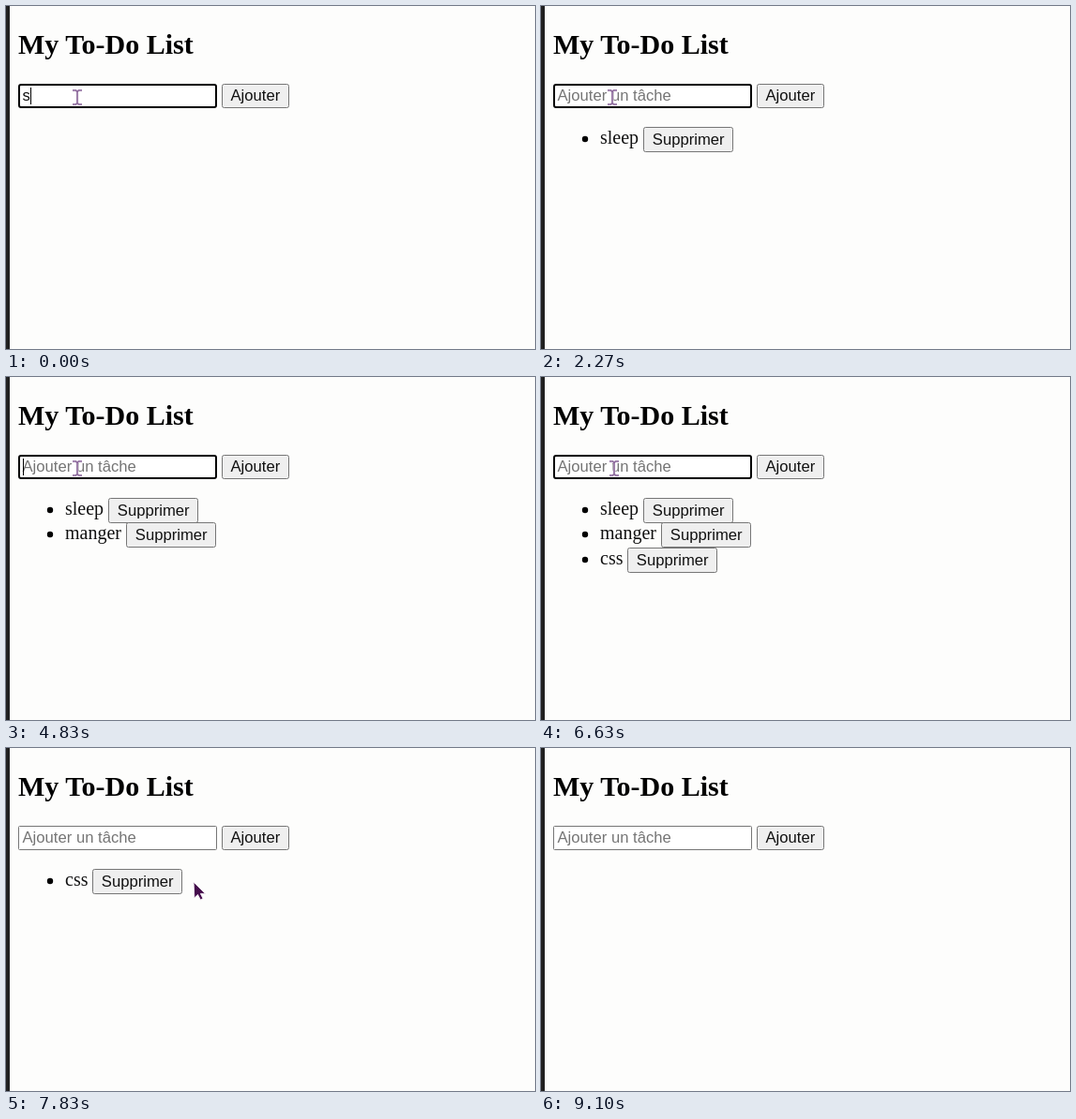
An HTML page that plays this animation: 564x366 px, repeating every 9.16 s.

```html
<!DOCTYPE html>
<html lang="fr">
<head>
<meta charset="utf-8">
<title>My To-Do List</title>
<style>
  html, body { margin: 0; width: 100%; height: 100%; overflow: hidden; background: #fdfdfc; }
  svg { display: block; }
  .serif { font-family: "Liberation Serif", "Times New Roman", serif; font-size: 20px; fill: #111; }
  .title { font-size: 30px; font-weight: bold; fill: #000; }
  .sans { font-family: "Liberation Sans", Arial, sans-serif; font-size: 16.667px; fill: #111; }
  .hint { fill: #757575; }
  .button rect { fill: #efefef; stroke: #767676; }
</style>
</head>
<body>
<svg width="564" height="366" viewBox="0 0 564 366">
  <rect width="564" height="366" fill="#fdfdfc"/>
  <rect width="4" height="366" fill="#202020"/>
  <text class="serif title" x="13" y="51">My To-Do List</text>
  <rect id="box" fill="#fff"/>
  <text id="field" class="sans" x="17.5" y="101"></text>
  <rect id="caret" y="87" width="1" height="18"/>
  <g class="button">
    <rect x="230.5" y="83.5" width="71" height="25" rx="2"/>
    <text class="sans" x="239.5" y="101">Ajouter</text>
  </g>
  <g id="list"></g>
  <g id="beam" fill="none">
    <path d="M-5 -7.5H-1.5L0 -6L1.5 -7.5H5M0 -6V6M-5 7.5H-1.5L0 6L1.5 7.5H5" stroke="#efe8f0" stroke-width="3"/>
    <path d="M-5 -7.5H-1.5L0 -6L1.5 -7.5H5M0 -6V6M-5 7.5H-1.5L0 6L1.5 7.5H5" stroke="#8a669a" stroke-width="1.6"/>
  </g>
  <path id="arrow" d="M0 0L.8 17L4.4 13.4L7.4 19L10 17.6L7.4 12.4H12.5Z" fill="#450c4c" stroke="#efe8f0"/>
</svg>
<script>
const LOOP = 9160;
const HINT = 'Ajouter un tâche';
const BLUR = 7230;

// [time, field text]; an empty text shows the placeholder
const typing = [
  [0, 's'], [330, 'sl'], [680, 'sle'], [980, 'slee'], [1370, 'sleep'], [1740, ''],
  [2350, 'm'], [2550, 'ma'], [2760, 'man'], [2950, 'mang'], [3150, 'mange'], [3350, 'manger'], [3660, ''],
  [5150, 'c'], [5450, 'cs'], [5680, 'css'], [6080, '']
];

// label, time added, time removed, x of its button
const tasks = [
  ['sleep', 1740, BLUR, 109],
  ['manger', 3660, 7640, 128],
  ['css', 6080, 8570, 92]
];

// [time, x, y]
const path = [
  [0, 76, 97.5], [6540, 76, 97.5], [6630, 78, 97.5], [7040, 200, 143], [7960, 200, 143],
  [8300, 168, 147], [8660, 168, 147], [8960, 510, 149], [9060, 580, 140], [LOOP, 580, 140]
];

const $ = id => document.getElementById(id);
const set = (el, attrs) => { for (const k in attrs) el.setAttribute(k, attrs[k]); };
const show = (el, on) => { el.style.display = on ? '' : 'none'; };

const rows = tasks.map(([label, from, to, x]) => {
  const el = document.createElementNS('http://www.w3.org/2000/svg', 'g');
  el.innerHTML = `<circle cx="47" cy="142" r="3.2"/>
    <text class="serif" x="63" y="147">${label}</text>
    <g class="button"><rect x="${x + .5}" y="129.5" width="95" height="26" rx="2"/>
    <text class="sans" x="${x + 9.8}" y="148">Supprimer</text></g>`;
  $('list').append(el);
  return { el, from, to };
});

function pointerAt(t) {
  const i = Math.max(1, path.findIndex(p => p[0] > t));
  const [t0, x0, y0] = path[i - 1], [t1, x1, y1] = path[i];
  const u = (t - t0) / (t1 - t0), e = u * u * (3 - 2 * u);
  return [x0 + (x1 - x0) * e, y0 + (y1 - y0) * e];
}

function draw(t) {
  const [keyTime, text] = typing.filter(k => k[0] <= t).pop();
  const focus = t < BLUR;
  const field = $('field');
  if (field.textContent !== (text || HINT)) field.textContent = text || HINT;
  field.classList.toggle('hint', !text);
  set($('box'), focus
    ? { x: 14, y: 84, width: 210, height: 24, rx: 2, stroke: '#000', 'stroke-width': 2 }
    : { x: 13.5, y: 83.5, width: 211, height: 25, rx: 1, stroke: '#767676', 'stroke-width': 1 });
  show($('caret'), focus && (t - keyTime) % 1000 < 500);
  $('caret').setAttribute('x', text ? Math.round(17.5 + field.getComputedTextLength()) : 18);

  let line = 0;
  for (const { el, from, to } of rows) {
    const on = t >= from && t < to;
    show(el, on);
    if (on) el.setAttribute('transform', `translate(0 ${Math.floor(26.5 * line++)})`);
  }

  const [x, y] = pointerAt(t);
  const inField = x > 13 && x < 225 && y > 83 && y < 109;
  for (const id of ['beam', 'arrow']) {
    show($(id), (id === 'beam') === inField);
    $(id).setAttribute('transform', `translate(${x} ${y})`);
  }
}

const start = performance.now();
function tick() {
  draw((performance.now() - start) % LOOP);
  requestAnimationFrame(tick);
}
tick();
</script>
</body>
</html>
```
